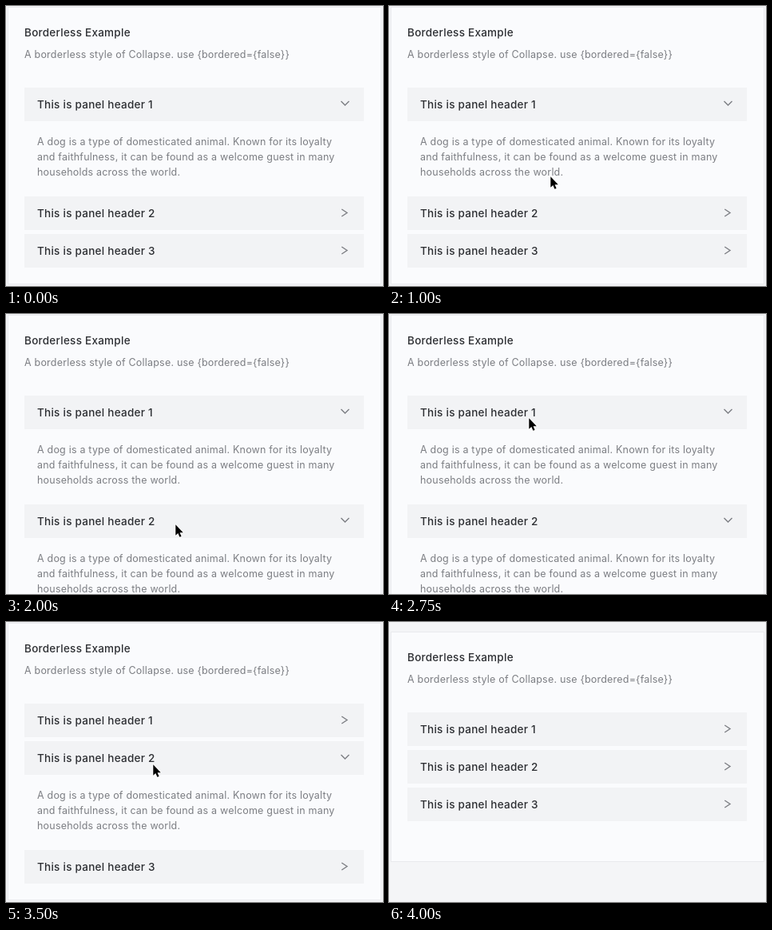
These frames come from a looping animation (472 by 350 pixels, 4.75 s). An HTML page:

```html
<!DOCTYPE html>
<html lang="en">
<head>
<meta charset="utf-8">
<title>Borderless collapse</title>
<style>
  html, body { margin: 0; width: 100%; height: 100%; overflow: hidden; background: #f4f5f7; }
  svg { display: block; width: 472px; height: 350px; }
  text { font: 12.5px Inter, sans-serif; letter-spacing: .2px; fill: #7c7e83; }
  .title { font-size: 13.5px; font-weight: 500; letter-spacing: .26px; fill: #2c2e32; }
  .card { fill: #fafbfd; stroke: #e9eaed; }
  .bar { fill: #f2f3f5; }
  .chevron { fill: none; stroke: #7c7e83; stroke-width: 1.4; }
  .cursor { fill: #000; stroke: #fff; stroke-width: 1.8; paint-order: stroke; stroke-linejoin: round; }
</style>
</head>
<body>
<svg viewBox="0 0 472 350">
  <g id="page">
    <rect class="card" id="card" x="2.5" y="1.5" width="467"/>
    <text class="title" x="23" y="38">Borderless Example</text>
    <text x="23" y="65">A borderless style of Collapse. use {bordered={false}}</text>
    <rect class="bar" id="gap" x="23" y="280" width="425" height="5"/>
    <g id="panels"></g>
  </g>
  <path class="cursor" id="cursor" d="M1.3 1.3V14.8L4.3 12 6.4 16.8 8.6 15.9 6.6 11.2H10.8Z"/>
</svg>
<script>
const LOOP = 4750, STEP = 250;
const TOP = 102, CLOSED = 47, OPEN = 136;
const RIGHT = 'M420.3 16L427 20.5 420.3 25';
const DOWN = 'M419.5 17L424.5 22 429.5 17';
const BODY = [
  'A dog is a type of domesticated animal. Known for its loyalty',
  'and faithfulness, it can be found as a welcome guest in many',
  'households across the world.'
];

// Layout from each start time: open panels, page offset, card height
const layouts = [
  { at: 0, open: [1], shift: 0, height: 346 },
  { at: 2000, open: [1, 2], shift: 0, height: 435 },
  { at: 3000, open: [2], shift: 0, height: 346 },
  { at: 3750, open: [], shift: 11, height: 287 }
];

// Pointer positions, one per step, from 500 ms to 4000 ms
const pointer = [
  [171, 216], [173, 216], [201, 212], [226, 246], [223, 253], [211, 261], [211, 262],
  [211, 268], [165, 161], [174, 129], [174, 129], [181, 167], [183, 177], [183, 177]
];

const $ = id => document.getElementById(id);
const move = (el, x, y) => el.setAttribute('transform', `translate(${x} ${y})`);
const show = (el, on) => el.setAttribute('visibility', on ? 'visible' : 'hidden');

$('panels').innerHTML = [1, 2, 3].map(n => `<g>
  <rect class="bar" x="23" width="425" height="42"/>
  <text class="title" x="39" y="26">This is panel header ${n}</text>
  <path class="chevron"/>
  <g class="body">${BODY.map((line, i) => `<text x="39" y="${72 + 19 * i}">${line}</text>`).join('')}</g>
</g>`).join('');
const panels = [...$('panels').children];

function render(t) {
  const { open, shift, height } = layouts.findLast(l => t >= l.at);
  move($('page'), 0, shift);
  $('card').setAttribute('height', height);
  show($('gap'), t >= 1750 && t < 2000);

  let y = TOP;
  panels.forEach((panel, i) => {
    const isOpen = open.includes(i + 1);
    move(panel, 0, y);
    panel.querySelector('.chevron').setAttribute('d', isOpen ? DOWN : RIGHT);
    show(panel.querySelector('.body'), isOpen);
    y += isOpen ? OPEN : CLOSED;
  });

  const spot = pointer[Math.floor(t / STEP) - 2];
  show($('cursor'), spot);
  if (spot) move($('cursor'), ...spot);
}

function tick() {
  render(performance.now() % LOOP);
  requestAnimationFrame(tick);
}
tick();
</script>
</body>
</html>
```
